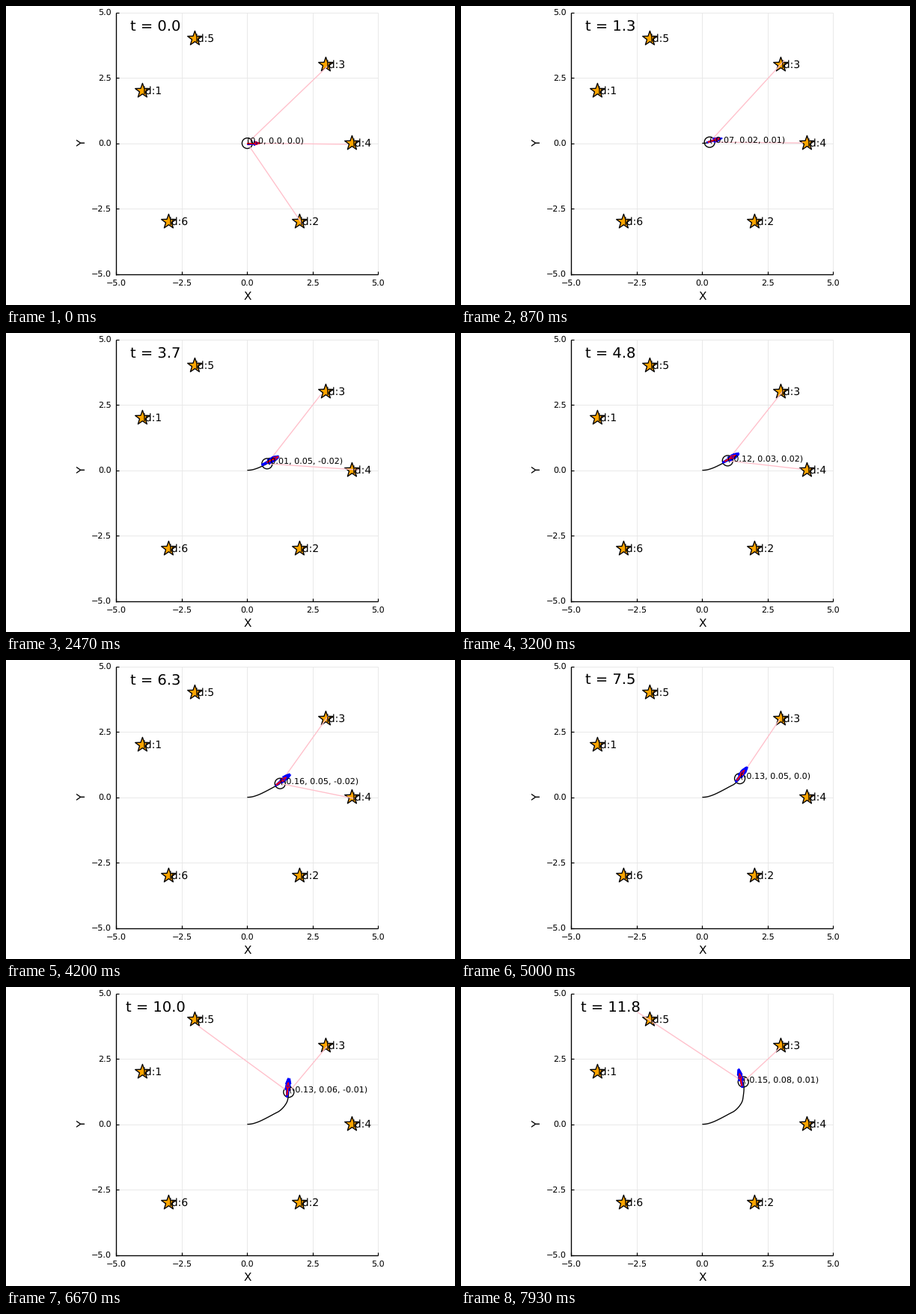
Animation, 600 px wide and 400 px high, one loop 8 s. Source, as a matplotlib script:

```python
import math

import numpy as np
import matplotlib.pyplot as plt
from matplotlib.animation import FuncAnimation
from matplotlib.collections import LineCollection, PolyCollection
from matplotlib.patches import Circle, Polygon, Rectangle

W, H, DPI = 600, 400, 100
FRAMES, LOOP = 120, 8000
DT = 0.1
SCALE, CX, CY = 35, 322.4, 183.6      # pixels per unit, origin on the stage
FOV = math.radians(60)
ARROW = 0.5
SPEED = 0.218
COUNT = 40

plt.rcParams["font.family"] = "DejaVu Sans"
plt.rcParams["text.hinting"] = "none"

LANDMARKS = {1: (-4, 2), 2: (2, -3), 3: (3, 3),
             4: (4, 0), 5: (-2, 4), 6: (-3, -3)}

# heading in degrees at a few moments; the path follows from it
TURN_TIMES = (0, 1.4, 2.7, 4.8, 5.7, 6.3, 8.0, 8.8, 10, 11.9)
TURNS = (0, 18, 26, 29, 26, 39, 60, 81, 84, 102)


def px(width):
    return width * 72 / DPI


def to_stage(x, y):
    return CX + SCALE * x, CY - SCALE * y


def heading(t):
    return np.radians(np.interp(t, TURN_TIMES, TURNS))


def drive():
    """Poses of the robot, moving at a steady speed along its heading."""
    t = np.arange(FRAMES) * DT
    mid = heading(t[:-1] + DT / 2)
    x = np.append(0, np.cumsum(SPEED * DT * np.cos(mid)))
    y = np.append(0, np.cumsum(SPEED * DT * np.sin(mid)))
    return np.column_stack([x, y, heading(t)])


def estimate_error(k):
    """Error of the estimated pose: along, across, heading."""
    t = k * DT
    noise = np.random.default_rng(500 + k).normal(0, (0.06, 0.01, 0.025))
    drift = np.array([-0.11, 0.02 + 0.004 * t, 0.01])
    return np.round(min(1, t / 2) * (drift + noise), 2) + 0.0


def shifted(pose, along, across, turn):
    x, y, a = pose
    c, s = math.cos(a), math.sin(a)
    return x + along * c - across * s, y + along * s + across * c, a + turn


def arrow(pose, head, half):
    """Stage points of an arrow: its shaft and its head triangle."""
    x, y, a = pose
    x, y = to_stage(x, y)
    c, s = math.cos(a), -math.sin(a)
    n = ARROW * SCALE
    tip = (x + n * c, y + n * s)
    bx, by = x + (n - head) * c, y + (n - head) * s
    tri = [tip, (bx - half * s, by + half * c), (bx + half * s, by - half * c)]
    return [(x, y), (bx, by)], tri


def scan(k, pose):
    """Noisy lines from the robot to the landmarks in view."""
    x, y, a = pose
    rng = np.random.default_rng(900 + k)
    lines = []
    for lx, ly in LANDMARKS.values():
        way = math.atan2(ly - y, lx - x)
        stretch = 1 + np.clip(rng.normal(0, 0.065), -0.14, 0.14)
        dist = math.hypot(lx - x, ly - y) * stretch
        noisy = way + rng.normal(0, math.radians(1))
        if abs(math.remainder(way - a, math.tau)) <= FOV:
            end = to_stage(x + dist * math.cos(noisy), y + dist * math.sin(noisy))
            lines.append([to_stage(x, y), end])
    return lines


fig = plt.figure(figsize=(W / DPI, H / DPI), dpi=DPI, facecolor="white")
ax = fig.add_axes([0, 0, 1, 1])
ax.set_xlim(0, W)
ax.set_ylim(H, 0)
ax.axis("off")

L, T = to_stage(-5, 5)
R, B = to_stage(5, -5)
frame_box = Rectangle((L, T), R - L, B - T, transform=ax.transData)


def drop(pt):
    """Distance from the middle of a digit down to its baseline."""
    return 0.335 * pt * DPI / 72


def label(x, y, text, pt, ha="left"):
    return ax.text(x, y + drop(pt), text, fontsize=pt, ha=ha, va="baseline",
                   color="black", zorder=20)


def line(xs, ys, width, color, z):
    return ax.plot(xs, ys, color=color, lw=px(width), zorder=z,
                   solid_capstyle="butt")[0]


for v in (-5, -2.5, 0, 2.5, 5):
    x, y = to_stage(v, v)
    line([x, x], [T, B], 0.9, "#e7e7e7", 1)
    line([L, R], [y, y], 0.9, "#e7e7e7", 1)
    line([x, x], [B, B - 3.5], 1.2, "black", 2)
    line([L, L + 3.5], [y, y], 1.2, "black", 2)
    name = f"{v:.1f}".replace("-", "\u2212")
    label(x, 370, name, 8, "center")
    label(141, y, name, 8, "right")
line([L, L], [T, B + 0.9], 1.35, "black", 2)
line([L, R], [B + 0.7, B + 0.7], 1.35, "black", 2)
label(CX, 388, "X", 11, "center")
ax.text(109.5, CY, "Y", fontsize=11, rotation=90, ha="right", va="center")

for n, (x, y) in LANDMARKS.items():
    sx, sy = to_stage(x, y)
    pts = []
    for i in range(10):
        r = 10.2 if i % 2 == 0 else 4.1
        q = math.pi * i / 5
        pts.append((sx + r * math.sin(q), sy - r * math.cos(q)))
    ax.add_patch(Polygon(pts, facecolor="orange", edgecolor="black",
                         lw=px(1.35), joinstyle="round", zorder=4))
    label(sx, sy, f"id:{n}", 10)

path = line([], [], 1.35, "black", 5)
body = ax.add_patch(Circle((CX, CY), 7, fill=False, ec="black", lw=px(1.35),
                           zorder=6))
nose = line([], [], 1.35, "black", 6)
beams = LineCollection([], colors="pink", linewidths=px(1.35), zorder=7)
shafts = LineCollection([], colors="blue", linewidths=px(1.3), zorder=8)
heads = PolyCollection([], facecolors="blue", edgecolors="none", zorder=9)
for c in (beams, shafts, heads):
    ax.add_collection(c, autolim=False)
beams.set_clip_path(frame_box)
guess = line([], [], 2, "red", 10)
guess_head = ax.add_patch(Polygon([(0, 0)] * 3, fill=False, ec="red",
                                  lw=px(1.2), zorder=10))

clock = label(*to_stage(-3.5, 4.5), "", 14, "center")
note = label(CX, CY, "", 8)

track = drive()
track_px = np.array([to_stage(x, y) for x, y, _ in track])

rng = np.random.default_rng(4)
phase = rng.uniform(0, math.tau, (COUNT, 3))
rate = rng.uniform(0.6, 2.4, (COUNT, 3))


def particles(t, pose, err):
    """Cloud of guessed poses, drifting around the robot."""
    spread = min(1, t / 2.5)
    for u, v, w in np.sin(phase + rate * t):
        yield shifted(pose, spread * (-0.08 + 0.13 * u),
                      0.9 * err[1] + spread * 0.025 * v,
                      0.7 * err[2] + spread * 0.06 * w)


def update(k):
    t = k * DT
    pose = track[k]
    err = estimate_error(k)
    x, y = track_px[k]
    c, s = math.cos(pose[2]), math.sin(pose[2])

    path.set_data(track_px[:k + 1, 0], track_px[:k + 1, 1])
    body.center = (x, y)
    nose.set_data([x, x + 7 * c], [y, y - 7 * s])
    beams.set_segments(scan(k, pose))

    cloud = [arrow(p, 8, 2.8) for p in particles(t, pose, err)]
    shafts.set_segments([a for a, _ in cloud])
    heads.set_verts([b for _, b in cloud])

    shaft, tri = arrow(shifted(pose, *err), 7, 2)
    guess.set_data(*zip(*shaft))
    guess_head.set_xy(tri)

    clock.set_text(f"t = {t:.1f}")
    note.set_position((x, y - 0.1 * SCALE + drop(8)))
    note.set_text("({}, {}, {})".format(*(float(e) for e in err)))
    return path, body, nose, beams, shafts, heads, guess, guess_head, clock, note


anim = FuncAnimation(fig, update, frames=FRAMES, interval=LOOP / FRAMES,
                     repeat=True, repeat_delay=0, blit=False)
plt.show()
```
